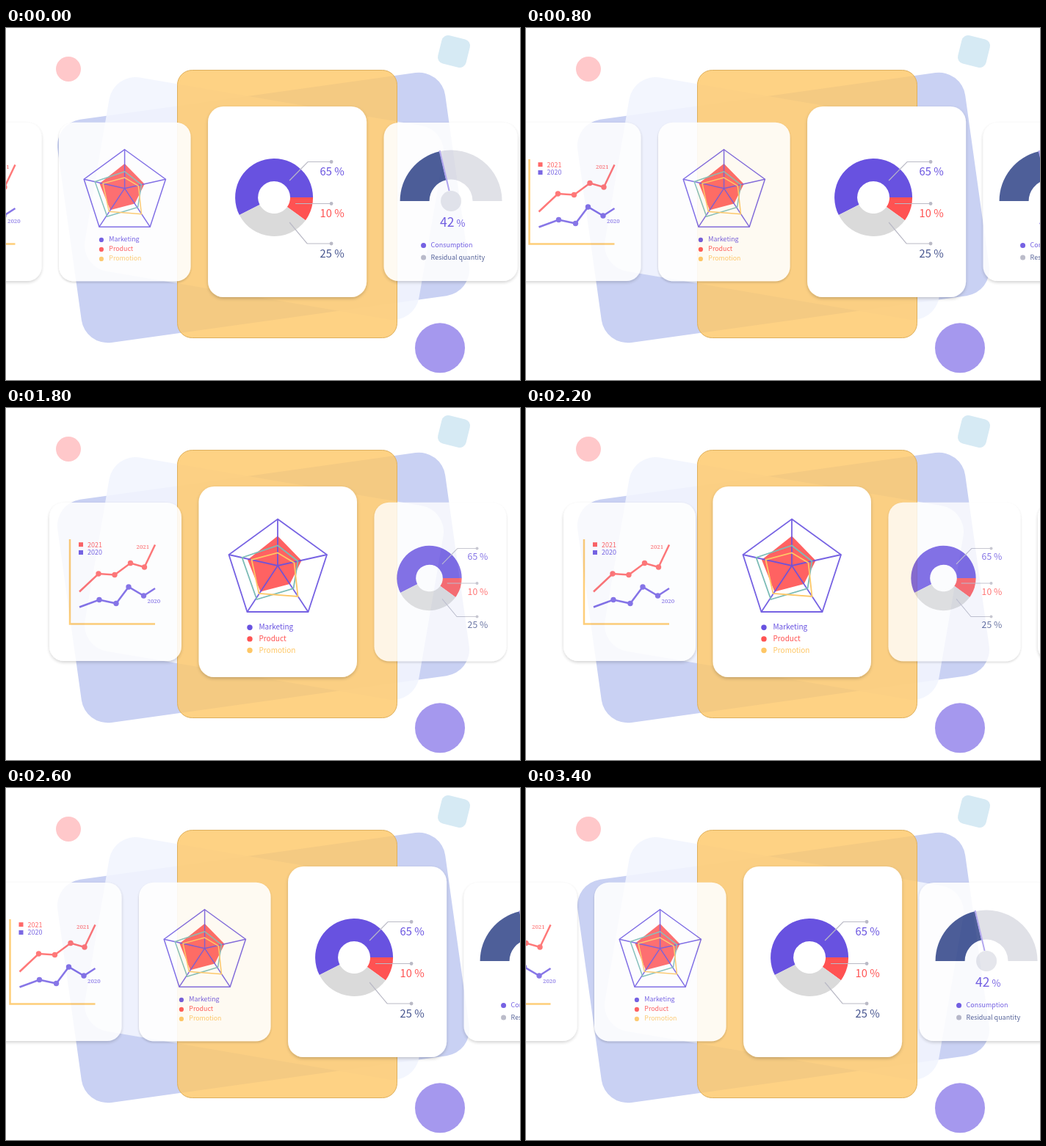
Write an HTML page that moves like this. It is 700x480 px and loops after 3.5 s.

```html
<!DOCTYPE html>
<html lang="en">
<head>
<meta charset="utf-8">
<title>Chart carousel</title>
<style>
  html, body { margin: 0; width: 100%; height: 100%; overflow: hidden; background: #fff; }
  svg { display: block; width: 100vw; height: 100vh; }
  text { font-family: "Noto Sans CJK JP", "Noto Sans CJK SC", "Noto Sans CJK", "Noto Sans", sans-serif; }
  .year { font-family: "Noto Serif", serif; }
</style>
</head>
<body>
<svg id="stage" viewBox="0 0 700 480" xmlns="http://www.w3.org/2000/svg">
  <defs>
    <filter id="shadow" x="-10%" y="-10%" width="120%" height="120%">
      <feDropShadow dx="0" dy="2" stdDeviation="2" flood-color="#000" flood-opacity=".2"/>
    </filter>
  </defs>
  <rect x="84" y="91.5" width="533" height="307" rx="36" fill="#c9d1f3" transform="rotate(-7.95 350.5 245)"/>
  <rect x="120.75" y="98.5" width="461.5" height="268" rx="36" fill="#f2f6fe" fill-opacity=".9" transform="rotate(9.7 351.5 232.5)"/>
  <rect x="233.5" y="57.5" width="299" height="365" rx="20" fill="#fec86a" fill-opacity=".82" stroke="#deb05e"/>
  <circle cx="85" cy="56" r="17" fill="#ffc8ca"/>
  <rect x="590.25" y="12.25" width="39.5" height="39.5" rx="9" fill="#d6eaf4" transform="rotate(14 610 32)"/>
  <circle cx="591" cy="436.3" r="34" fill="#a598ee"/>
  <g id="cards"></g>
</svg>
<script>
const PURPLE = '#6852e0', RED = '#ff5252', YELLOW = '#fec766', TEAL = '#7cbcb6',
      NAVY = '#47558f', GREY = '#babac6';
const GAP = 23.5, MID = 237, ZOOM = 1.2, LOOP = 3500, STEP = 100;

const dot = (x, y, r, fill) => `<circle cx="${x}" cy="${y}" r="${r}" fill="${fill}"/>`;
const label = (x, y, size, fill, str, extra = '') =>
  `<text x="${x}" y="${y}" font-size="${size}" fill="${fill}" ${extra}>${str}</text>`;
const line = (pts, color, w) =>
  `<polyline points="${pts}" fill="none" stroke="${color}" stroke-width="${w}"/>`;
const poly = (pts, color, w) =>
  `<polygon points="${pts}" fill="none" stroke="${color}" stroke-width="${w}"/>`;

// Ring segment, angles in degrees clockwise from the right
function ring(cx, cy, r, hole, from, to, fill) {
  const at = (rad, deg) => {
    const a = deg * Math.PI / 180;
    return `${cx + rad * Math.cos(a)} ${cy + rad * Math.sin(a)}`;
  };
  const big = to - from > 180 ? 1 : 0;
  return `<path fill="${fill}" d="M${at(r, from)}A${r} ${r} 0 ${big} 1 ${at(r, to)}` +
    `L${at(hole, to)}A${hole} ${hole} 0 ${big} 0 ${at(hole, from)}Z"/>`;
}

function trend(pts, color) {
  const dots = pts.slice(1, -1).map(([x, y]) => dot(x, y, 3.7, color)).join('');
  return line(pts.join(' '), color, 2.5) + dots;
}

function lineChart() {
  const key = (y, color, str) =>
    `<rect x="40" y="${y}" width="6" height="6" fill="${color}"/>` +
    label(52, y + 6.3, 9, color, str, 'font-weight="500"');
  return line('28,50 28,165.5 144,165.5', YELLOW, 2.5) +
    key(54.2, RED, '2021') + key(65, PURPLE, '2020') +
    trend([[41, 121.5], [67, 97], [89, 98.5], [110.5, 82.5], [129.5, 88], [144, 57.5]], '#ff6666') +
    trend([[41, 142.5], [68, 132.5], [91, 137.5], [108, 115], [128.5, 127], [144, 117]], '#7662e4') +
    label(118.5, 63, 7.9, RED, '2021', 'class="year"') +
    label(133.5, 137, 7.9, PURPLE, '2020', 'class="year"');
}

function radarChart() {
  const hub = [107.5, 108];
  const web = [[107.5, 44.5], [174.5, 93], [149, 171], [66, 171], [41, 93]];
  const spokes = web.map(p => `M${hub}L${p}`).join('');
  const legend = [['Marketing', PURPLE], ['Product', RED], ['Promotion', YELLOW]]
    .map(([str, color], i) => dot(69.5, 192.3 + i * 15.6, 3.7, color) +
      label(82, 195.4 + i * 15.6, 10, color, str, 'class="key"')).join('');
  return `<polygon points="107.5,67.5 140,101 124,133 84,143.5 66.5,100" fill="${RED}" fill-opacity=".9"/>` +
    `<g opacity=".9">${poly(web.join(' '), PURPLE, 1.8)}` +
    `<path d="${spokes}" stroke="${PURPLE}" stroke-width="1.8"/></g>` +
    poly('107.5,80.5 135,102 129,139 79,154 59,97', TEAL, 1.8) +
    poly('107.5,90.5 130,104 135,150 82,146 72,100', YELLOW, 1.8) + legend;
}

function donutChart() {
  const seg = (from, to, fill) => ring(90, 124, 53, 22, from, to, fill);
  const leader = (pts, y, color, str) => line(`${pts} 168,${y}`, GREY, 1.2) +
    dot(168, y, 2.4, GREY) + label(152.5, y + 18.8, 14.7, color, str);
  return seg(153, 360, PURPLE) + seg(0, 36, RED) + seg(36, 153, '#dadada') +
    leader('111,101 136,75.5', 75.5, PURPLE, '65 %') +
    leader('119,132.5', 132.5, RED, '10 %') +
    leader('111,158 135,187', 187, NAVY, '25 %');
}

function gaugeChart() {
  const seg = (from, to, fill) => ring(91.5, 107, 69.5, 29.5, from, to, fill);
  const key = (y, color, ink, str) => dot(54, y, 3.5, color) +
    label(64, y + 2.8, 9, ink, str, 'font-weight="500"');
  return seg(180, 257, '#3b4e8e') + seg(257, 360, '#dddee5') +
    line('76,38 89,93', '#ac9fee', 2) + dot(91.5, 107, 14, '#e3e4ea') +
    label(76.5, 142, 17.6, PURPLE, '42<tspan font-size="13" dx="3">%</tspan>') +
    key(167.5, PURPLE, PURPLE, 'Consumption') +
    key(184, '#b4b5c5', NAVY, 'Residual quantity');
}

// width and height are in each card's own units; zoomable cards shrink when not active
const cards = [
  { w: 180, h: 216, alpha: .87, draw: lineChart },
  { w: 215.5, h: 260, alpha: .9, draw: radarChart, zoom: true },
  { w: 216, h: 260, alpha: .8, draw: donutChart, zoom: true },
  { w: 182, h: 216, alpha: .9, draw: gaugeChart }
];
const RADAR = 1, DONUT = 2;

document.getElementById('cards').innerHTML = cards.map(c =>
  `<g><rect width="${c.w}" height="${c.h}" rx="20" fill="#fff" filter="url(#shadow)"/>${c.draw()}</g>`).join('');
cards.forEach((c, i) => {
  c.el = document.getElementById('cards').children[i];
  c.box = c.el.firstChild;
  c.keys = c.el.querySelectorAll('.key');
});

// Each run: active card and [time, strip offset] stops, straight motion between them
const runs = [
  { active: DONUT, stops: [[0, -131.5], [400, -131.5], [800, -23.5]] },
  { active: RADAR, stops: [[900, -13.5], [1300, -13.5], [1800, 59], [1900, 72], [2100, 72], [2500, -12]] },
  { active: DONUT, stops: [[2600, -22.5], [3000, -22.5], [3400, -110.5]] }
];

function offsetAt(stops, t) {
  const i = stops.findIndex(s => s[0] >= t);
  if (i < 0) return stops[stops.length - 1][1];
  if (i === 0) return stops[0][1];
  const [t0, x0] = stops[i - 1], [t1, x1] = stops[i];
  return x0 + (x1 - x0) * (t - t0) / (t1 - t0);
}

function render(ms) {
  const t = Math.floor(ms % LOOP / STEP) * STEP;
  const run = runs.filter(r => r.stops[0][0] <= t).pop();
  let x = offsetAt(run.stops, t);
  cards.forEach((c, i) => {
    const on = i === run.active;
    const k = c.zoom && !on ? 1 / ZOOM : 1;
    c.el.setAttribute('transform', `translate(${x} ${MID - c.h * k / 2}) scale(${k})`);
    c.el.setAttribute('opacity', on ? 1 : c.alpha);
    c.box.setAttribute('rx', on ? 21 : 20 / k);
    c.keys.forEach(el => {
      el.setAttribute('font-size', on ? 10 : 10.6);
      el.setAttribute('font-weight', on ? 400 : 500);
    });
    x += c.w * k + GAP;
  });
}

const start = performance.now();
function tick() {
  render(performance.now() - start);
  requestAnimationFrame(tick);
}
render(0);
requestAnimationFrame(tick);
</script>
</body>
</html>
```
